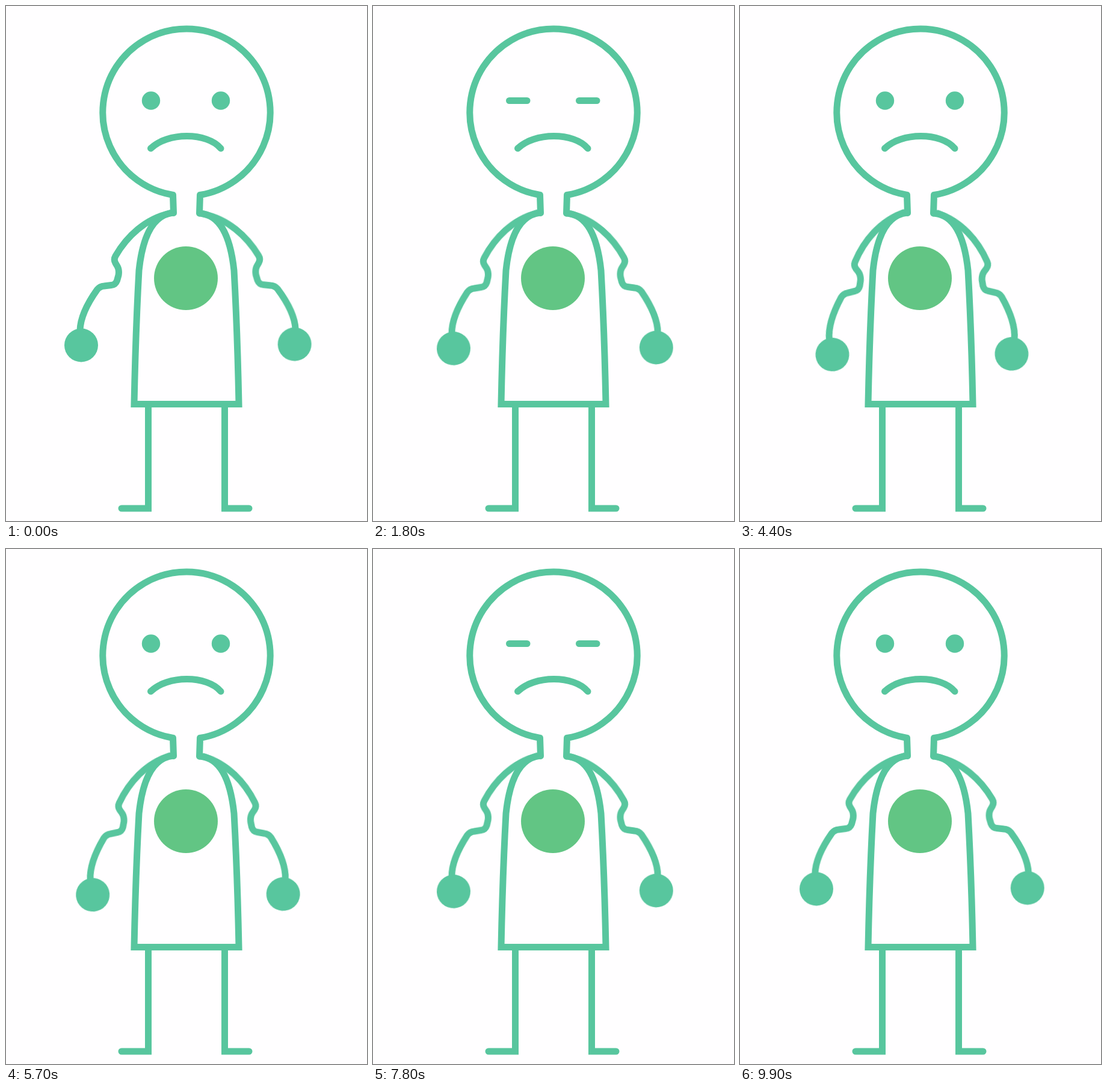
An HTML page that plays this animation: 600 px wide and 857 px high, repeating every 10 s.

```html
<!DOCTYPE html>
<html lang="en">
<head>
<meta charset="utf-8">
<title>Sad figure</title>
<style>
  html, body { margin: 0; width: 100%; height: 100%; overflow: hidden; background: #fffeff; }
  svg { display: block; width: 100%; height: 100%; }

  .line { fill: none; stroke: #58c69e; stroke-width: 11; stroke-linecap: round; }
  .soft { stroke-linejoin: round; }
  .dot { fill: #58c69e; stroke: none; }
  .badge { fill: #62c584; }

  .arm { transform-origin: 262px 347px; animation: swing 1s step-end infinite; }
  .open { animation: open 10s step-end infinite; }
  .closed { animation: closed 10s step-end infinite; }

  /* Eased swing of 7.75 degrees, held for a tenth of a second per pose */
  @keyframes swing {
    0%, 100% { transform: rotate(0deg); }
    10% { transform: rotate(-.77deg); }
    20% { transform: rotate(-2.82deg); }
    30% { transform: rotate(-5.42deg); }
    40% { transform: rotate(-7.24deg); }
    50% { transform: rotate(-7.74deg); }
    60% { transform: rotate(-6.98deg); }
    70% { transform: rotate(-4.93deg); }
    80% { transform: rotate(-2.33deg); }
    90% { transform: rotate(-.51deg); }
  }
  @keyframes open {
    0%, 30%, 55%, 90%, 100% { opacity: 1; }
    10%, 50%, 70% { opacity: 0; }
  }
  @keyframes closed {
    0%, 30%, 55%, 90%, 100% { opacity: 0; }
    10%, 50%, 70% { opacity: 1; }
  }
</style>
</head>
<body>
<svg viewBox="0 0 600 857">
  <defs>
    <g id="arm">
      <path class="soft" d="M272 345C232 354 201 383 182 416Q178.500 422 182 428L185 433Q188.500 439 187 448L184.500 457Q182 464 175 464.500L163 466Q156 466.500 151.500 472C136.500 493 123.500 518 123 540"/>
      <circle class="dot" cx="125" cy="564.5" r="28"/>
    </g>
  </defs>

  <g class="line">
    <!-- head and neck -->
    <path class="soft" d="M278.5 344.5L277.5 314.5A139.2 139.2 0 1 1 322.5 314.5L321.5 345"/>
    <path d="M240.5 237C268 210 334 209.500 357 237"/>

    <!-- torso -->
    <path d="M278 344C244 347 227 384 221 440C218 495 215 560 213 662.5H387C385 560 382 495 379 440C373 384 356 347 322 345"/>

    <!-- legs -->
    <path d="M236.5 664V836H192M363.5 664V836H404"/>

    <!-- arms, the right one mirrored and raised a little -->
    <use class="arm" href="#arm"/>
    <g transform="matrix(-1 0 0 1 600.5 1) rotate(1.1 262 347)">
      <use class="arm" href="#arm"/>
    </g>

    <!-- eyes -->
    <g class="open">
      <circle class="dot" cx="241" cy="157.5" r="15.2"/>
      <circle class="dot" cx="357" cy="157.5" r="15.2"/>
    </g>
    <path class="closed" d="M226.5 157.5H256M342.5 157.5H372"/>
  </g>

  <circle class="badge" cx="299" cy="453" r="53"/>
</svg>
</body>
</html>
```
